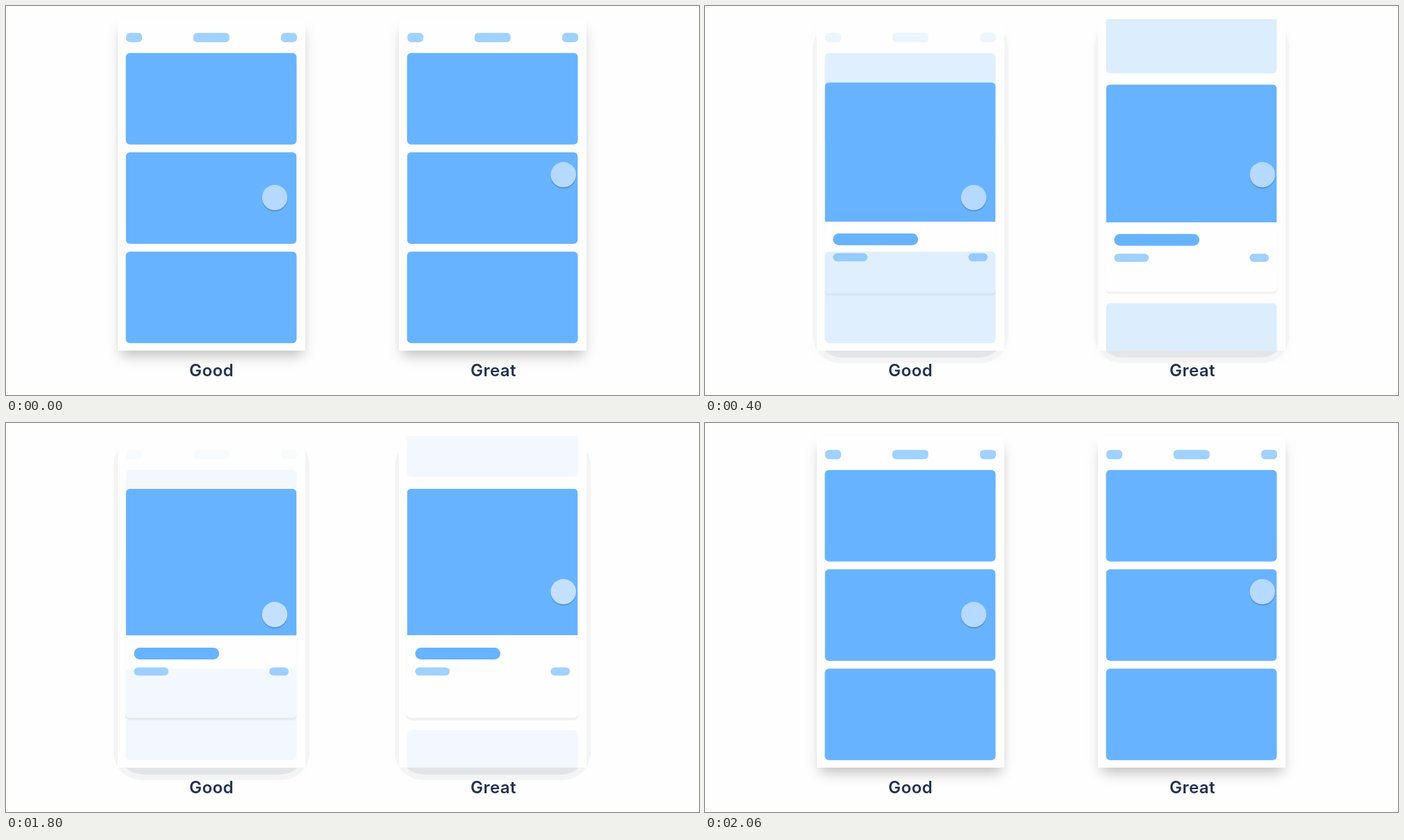
Write an HTML page with a canvas that moves like this. It is 998 by 561 pixels and loops after 2200 ms.

```html
<!DOCTYPE html>
<html lang="en">
<head>
<meta charset="utf-8">
<title>Card expansion</title>
<style>
  html, body { margin: 0; width: 100%; height: 100%; overflow: hidden; background: #fefefe; }
  canvas { position: absolute; left: 0; top: 0; }
  p {
    position: absolute; top: 511px; width: 200px; margin: 0; text-align: center;
    font: 600 24px/30px Inter, sans-serif; letter-spacing: .5px; color: #21314f;
  }
</style>
</head>
<body>
<canvas width="998" height="561"></canvas>
<p style="left:196px">Good</p>
<p style="left:602px">Great</p>
<script>
const ctx = document.querySelector('canvas').getContext('2d');
const LOOP = 2200, FPS = 15;
const BLUE = '#68b3ff', PALE = '#a0d1ff', WHITE = '#fefefe';

// Each phone: offset, touch point, [start, duration] of opening and closing,
// and how far the rows above and below are pushed away.
const phones = [
  { dx: 0, touch: [387, 276.3], open: [192, 400], close: [1754, 285], up: 0, down: 0 },
  { dx: 405, touch: [397.7, 243.3], open: [226, 348], close: [1751, 306], up: 132, down: 96 }
];

const mix = (a, b, p) => a + (b - a) * p;

// cubic-bezier(.4, 0, .2, 1)
function ease(x) {
  if (x <= 0) return 0;
  if (x >= 1) return 1;
  let lo = 0, hi = 1, s;
  for (let i = 0; i < 24; i++) {
    s = (lo + hi) / 2;
    const r = 1 - s;
    if (1.2 * r * r * s + .6 * r * s * s + s ** 3 < x) lo = s; else hi = s;
  }
  return s * s * (3 - 2 * s);
}

const run = (t, [start, duration]) => ease((t - start) / duration);

function box(x, y, w, h, r, color) {
  ctx.beginPath();
  ctx.roundRect(x, y, w, h, r);
  ctx.fillStyle = color;
  ctx.fill();
}

function shadow(y, blur, alpha) {
  ctx.shadowOffsetY = y;
  ctx.shadowBlur = blur;
  ctx.shadowColor = `rgba(0,0,0,${alpha})`;
}

function layer(alpha, draw) {
  ctx.save();
  ctx.globalAlpha = alpha;
  draw();
  ctx.restore();
}

function drawBody(p) {
  layer(1 - p, () => {
    shadow(11, 18, .25);
    box(165.5, 23.5, 261, 469, 0, WHITE);
  });
  layer(p, () => {
    box(155, 21, 282, 494, 40, '#f3f3f3');
    box(161, 40, 270, 467, 36, '#dfe3e7');
  });
  box(161, 19, 270, 478, 0, WHITE);
}

function drawCard(p) {
  const top = mix(211, 85, p), split = mix(343, 303, p), bottom = mix(343, 432, p);
  layer(1, () => {
    shadow(3.5, 2, .07 * p);
    box(172, top, 247, bottom - top, 6, WHITE);
  });
  layer(1, () => {
    ctx.beginPath();
    ctx.roundRect(172.5, top, 246, bottom - top, 6);
    ctx.clip();
    box(172.5, top, 246, split - top, 0, BLUE);
    const title = split + mix(11.3, 18.5, p);
    box(184.3, title, 122.7, 17, 8.5, BLUE);
    box(184.3, title + 28.5, 49.7, 11.6, 5.8, PALE);
    box(379.3, title + 28.5, 27.7, 11.6, 5.8, PALE);
  });
}

function drawPhone({ dx, touch, open, close, up, down }, t) {
  const closing = run(t, close), p = run(t, open) - closing;
  const rise = -up * p, drop = down * p;
  ctx.save();
  ctx.translate(dx, 0);
  drawBody(p);
  layer(1, () => {
    ctx.beginPath();
    ctx.rect(161, 19, 270, 478);
    ctx.clip();
    drawCard(p);
    ctx.globalAlpha = 1 - p;
    for (const [x, w] of [[173, 23], [269.7, 52], [396, 23]])
      box(x, 38.7 + rise, w, 13.5, 5.5, PALE);
    box(172.5, 67.7 + rise, 246, 132, 6, BLUE);
    box(172.5, 354.3 + drop, 246, 132, 6, BLUE);
  });
  const glow = p === 1 ? .39 : closing ? .51 + .1 * p : .51;
  layer(1, () => {
    shadow(1.5, 1.5, .3);
    box(touch[0] - 18, touch[1] - 18, 36, 36, 18, BLUE);
  });
  layer(glow, () => box(touch[0] - 18.3, touch[1] - 18.3, 36.6, 36.6, 18.3, '#fff'));
  ctx.restore();
}

function frame() {
  // The motion advances in 15 steps a second, on a 10 ms clock.
  const now = Math.floor(performance.now() % LOOP / 10) * 10 + 9.9;
  const t = Math.floor(now * FPS / 1000) * 1000 / FPS;
  ctx.clearRect(0, 0, 998, 561);
  for (const phone of phones) drawPhone(phone, t);
  requestAnimationFrame(frame);
}
frame();
</script>
</body>
</html>
```
